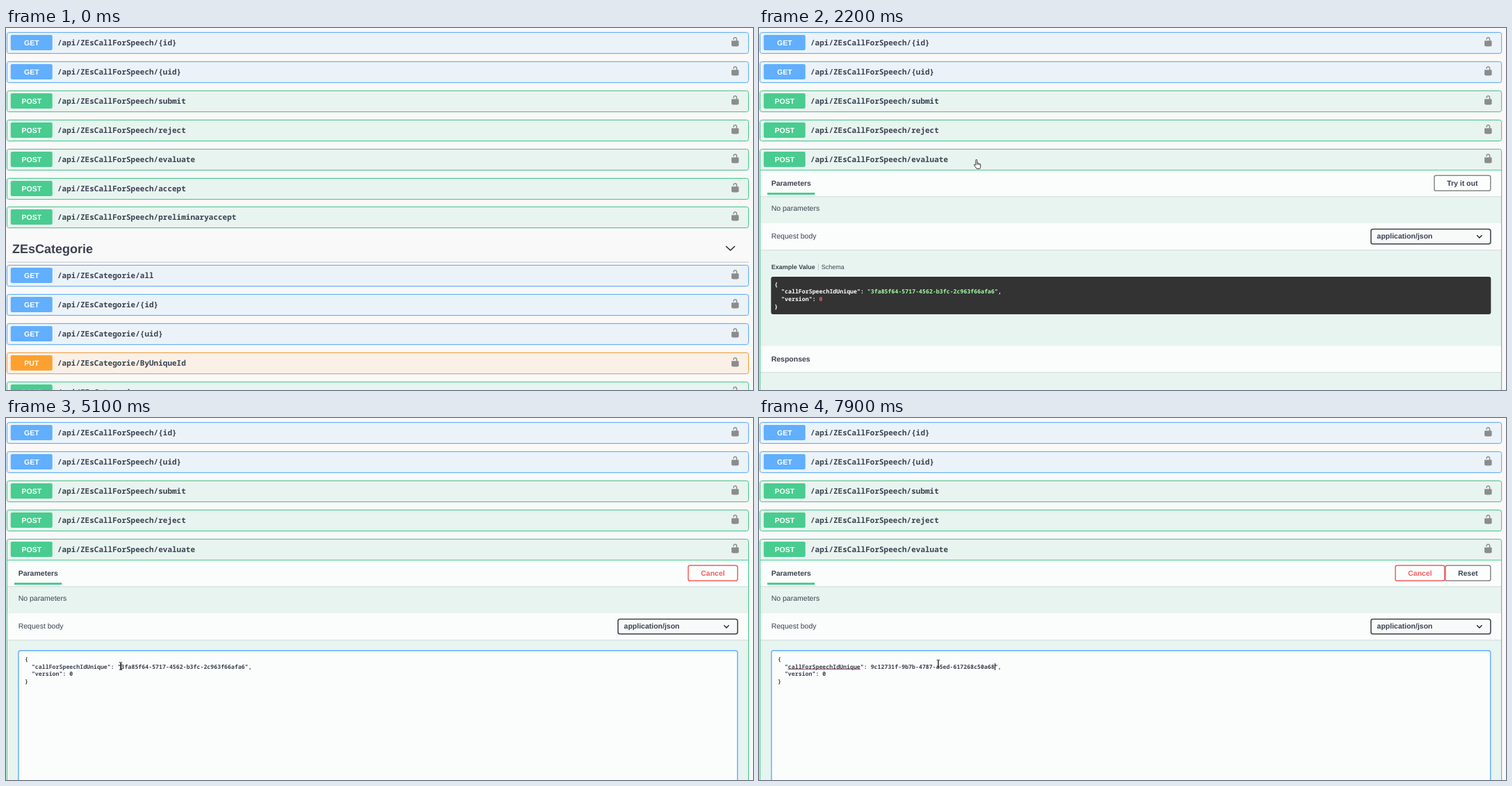
An HTML page that plays this animation: 1075x521 px, repeating every 8000 ms.

```html
<!DOCTYPE html>
<html lang="en">
<head>
<meta charset="utf-8">
<title>API explorer</title>
<style>
  html, body { margin: 0; width: 100%; height: 100%; overflow: hidden; background: #f9f9f9; }
  svg { display: block; width: 1075px; height: 521px; }
  text { font: 10.5px "Liberation Sans", Arial, sans-serif; fill: #3b4151; white-space: pre; text-rendering: geometricPrecision; }
  .b { font-weight: 700; }
  .mid { text-anchor: middle; }
  .badge { fill: #fff; }
  .path { font: 600 11px "Noto Sans Mono", monospace; }
  .code { font: 700 8.25px "Noto Sans Mono", monospace; }
  .small { font-size: 9px; }
  .head { font-size: 18px; }
  .light { fill: #fff; }
  .glow { fill: none; stroke: #000; stroke-opacity: .05; stroke-width: 3; }
  .line { fill: none; stroke: #222; stroke-width: 1.4; }
  .btn { fill: #fcfefd; stroke-width: 1.5; }
  .lock { fill: #8c8c8c; }
  .hidden { display: none; }
</style>
</head>
<body>
<svg id="stage" viewBox="0 0 1075 521"></svg>
<script>
const LOOP = 8000, STEP = 100;
const CHAR = 4.95, PITCH = 10.35;
const ANCHOR = 160.8;            // left edge of the value in the focused editor
const GUID = '3fa85f64-5717-4562-b3fc-2c963f66afa6';
const PASTED = '9c12731f-9b7b-4787-a5ed-617268c50a68';
const KEY = '  "callForSpeechIdUnique": ';
const colors = {
  GET: ['#61affe', '#ebf3f9'],
  POST: ['#49cc90', '#e8f4ef'],
  PUT: ['#fca130', '#fbf0e5']
};
const LOCK = 'M15.8 8H14V5.6C14 2.703 12.665 1 10 1 7.334 1 6 2.703 6 5.6V6h2v-.801C8 3.754 8.797 3 10 3s2 .754 2 2.199V8H4c-.553 0-1 .646-1 1.199V17c0 .549.428 1.139.951 1.307l1.197.387C5.672 18.861 6.55 19 7.1 19h5.8c.549 0 1.428-.139 1.951-.307l1.196-.387c.524-.167.953-.757.953-1.306V9.199C17 8.646 16.352 8 15.8 8z';

const text = (x, y, str, cls = '') => `<text x="${x}" y="${y}" class="${cls}">${str}</text>`;
const rect = (x, y, w, h, attrs) => `<rect x="${x}" y="${y}" width="${w}" height="${h}" ${attrs}/>`;

function row(y, method, path, h = 30) {
  const [main, pale] = colors[method];
  return rect(1.5, y + .5, 1067, h, 'rx="3" class="glow"') +
    rect(1.5, y + .5, 1067, h, `rx="3" fill="${pale}" stroke="${main}"`) +
    rect(6.75, y + 4, 60, 22, `rx="2.2" fill="${main}"`) +
    text(36.8, y + 18.7, method, 'b mid badge') +
    text(74, y + 19, '/api/' + path, 'path') +
    `<path class="lock" transform="translate(1041.8 ${y + 6.3}) scale(.75)" d="${LOCK}"/>`;
}

// white strip with a soft lower edge
const strip = (y, h) => rect(2, y, 1066, h, 'fill="#fbfdfc"') +
  rect(2, y + h, 1066, 1, 'fill="#000" fill-opacity=".07"') +
  rect(2, y + h + 1, 1066, 1, 'fill="#000" fill-opacity=".025"');

const button = (id, x, w, label, color) => `<g id="${id}">` +
  rect(x + .75, 212.25, w - 1.5, 22, `rx="2.6" class="btn" stroke="${color}"`) +
  `<text x="${x + w / 2}" y="227" class="b mid" style="fill:${color === '#888' ? '#3b4151' : color}">${label}</text></g>`;

const lines = (x, y, pitch, list, cls) =>
  list.map((s, i) => text(x, +(y + i * pitch).toFixed(2), s, 'code ' + cls)).join('');

const json = value => ['{', KEY + value + ',', '  "version": 0', '}'];
const editor = (value, cls = '') => lines(27, 350.45, PITCH, json(value), cls);

const speech = 'ZEsCallForSpeech/', cat = 'ZEsCategorie';
const closed = row(174, 'POST', speech + 'evaluate') +
  row(216, 'POST', speech + 'accept') +
  row(257, 'POST', speech + 'preliminaryaccept') +
  text(9, 324, cat, 'b head') +
  '<path class="line" d="M1036 314l6.5 6 6.5-6"/>' +
  rect(2, 336.5, 1067, 1, 'fill="#3b4151" fill-opacity=".3"') +
  row(341, 'GET', cat + '/all') +
  row(383, 'GET', cat + '/{id}') +
  row(425, 'GET', cat + '/{uid}') +
  row(467, 'PUT', cat + '/ByUniqueId') +
  row(509, 'POST', cat);

const example = text(17.7, 347, 'Example Value', 'b small') +
  text(89.8, 347, 'Schema', 'small') +
  rect(85, 339, 1, 10, 'fill="#c4cbc8"') +
  rect(17.3, 358, 1036, 54, 'rx="3" fill="#333"') +
  lines(22.2, 371.5, 10.8, ['{',
    `${KEY}<tspan fill="#a2fca2">"${GUID}"</tspan>,`,
    '  "version": <tspan fill="#d36363">0</tspan>', '}'], 'light') +
  strip(457.5, 37.5) + text(17.7, 479.5, 'Responses', 'b');

const form = rect(17.3, 334, 1036, 220, 'rx="3" fill="#fbfdfc"') +
  rect(17.9, 334.7, 1034.8, 220, 'id="focus" rx="3" fill="none" stroke="#61affe" stroke-width="1.5"') +
  `<g id="before">${editor('"' + GUID + '"')}</g>` +
  `<g id="after">${editor(PASTED + '"')}</g>` +
  `<g id="sel" clip-path="url(#range)">${rect(20, 345, 400, 40, 'fill="#338fec"')}${editor('"' + GUID + '"', 'light')}</g>` +
  rect(41.5, 361.2, 104.5, 1, 'id="spell" fill="#e0393f"') +
  rect(0, 353, 1, 10, 'id="caret" fill="#111"');

const panel = row(174, 'POST', speech + 'evaluate', 380) +
  rect(2, 204, 1066, 1, 'fill="#49cc90"') +
  strip(205, 37) + text(17.7, 227, 'Parameters', 'b') +
  rect(12, 237, 68.3, 3, 'fill="#49cc90"') +
  rect(971, 211.5, 82, 23.5, 'id="hover" rx="3" class="glow"') +
  button('try', 971, 82.5, 'Try it out', '#888') +
  button('cancelHot', 981, 72.5, 'Cancel', '#8c4554') +
  button('cancel', 981, 72.5, 'Cancel', '#f95c5c') +
  `<g id="pair">${button('reset', 987, 66.5, 'Reset', '#888')}${button('cancel2', 915, 72.5, 'Cancel', '#f95c5c')}</g>` +
  text(17.7, 262.8, 'No parameters') +
  strip(281, 38) + text(17.7, 303.2, 'Request body') +
  rect(880, 289.8, 173.5, 22, 'rx="3" class="glow"') +
  rect(880.75, 289.5, 172, 21.2, 'rx="2.8" fill="#f8f9f9" stroke="#41444e" stroke-width="1.5"') +
  text(889.3, 303.2, 'application/json', 'b') +
  '<path class="line" d="M1033.2 298.3l3.6 3.6 3.6-3.6"/>' +
  `<g id="example">${example}</g><g id="form">${form}</g>`;

const pointers = '<g id="hand"><path d="M-.6 8.4V1.4a1 1 0 0 1 2 0V5.4q1.4-.5 1.7.5 1.4-.4 1.7.6 1.5-.2 1.5 1.3V10.2q0 1.6-1 3.4H.8Q-1 11-2.9 8.5-3.2 7.2-1.9 7.4z" fill="#fff" stroke="#222" stroke-width=".9"/><path d="M1.4 5.5v2.6M3.1 6v2.2M4.8 6.6v1.8" stroke="#222" stroke-width=".7"/></g>' +
  '<path id="arrow" d="M.3.5v11.6l2.7-2.5 1.8 4 1.7-.7-1.8-3.9h3.7z" fill="#fff" stroke="#222" stroke-width=".8"/>' +
  '<path id="beam" d="M-2.3-5.2h1.8q.5 0 .5.6V4.6q0 .6-.5.6h-1.8M2.3-5.2H.5Q0-5.2 0-4.6V4.6q0 .6.5.6h1.8" fill="none" stroke="#222" stroke-width=".9"/>';

document.getElementById('stage').innerHTML =
  '<clipPath id="range"><rect id="sel1" x="160.8" y="352.6" height="10.4"/><rect id="sel2" x="26.6" y="362.9" width="70" height="10.5"/></clipPath>' +
  rect(0, 0, 1075, 521, 'fill="#f9f9f9"') +
  row(6, 'GET', speech + '{id}') + row(48, 'GET', speech + '{uid}') +
  row(90, 'POST', speech + 'submit') + row(132, 'POST', speech + 'reject') +
  `<g id="closed">${closed}</g><g id="open">${panel}</g><g id="pointer">${pointers}</g>`;

const $ = id => document.getElementById(id);
const show = (id, on) => $(id).classList.toggle('hidden', !on);

const ease = {
  in: p => p * p,
  out: p => p * (2 - p),
  both: p => p * p * (3 - 2 * p),
  lin: p => p,
  hold: () => 0
};
// time, x, y of the hot spot, easing toward the next entry
const track = [
  [100, 940.5, 91, 'hold'], [500, 940.5, 91, 'both'], [1400, 314, 216, 'out'],
  [2100, 312.5, 189, 'hold'], [2600, 330.5, 194, 'hold'], [2700, 330.5, 194, 'in'],
  [3100, 650, 263, 'out'], [3500, 1006, 226, 'hold'], [3800, 1006, 226, 'both'],
  [4500, 160, 370, 'out'], [4700, 165, 357, 'hold'], [5100, 165, 357, 'lin'],
  [5300, 161, 357, 'in'], [5700, 300, 360, 'lin'], [5800, 325, 363.2, 'out'],
  [6200, 342, 363.5, 'lin'], [6500, 345.5, 358.5, 'hold'], [7200, 345.5, 358.5, 'both'],
  [7900, 258, 353.5, 'hold'], [8000, 258, 353.5, 'hold']
];

function pointerAt(t) {
  const i = Math.max(0, track.findIndex(k => k[0] > t) - 1);
  const [t0, x0, y0, kind] = track[i], [t1, x1, y1] = track[i + 1];
  const p = ease[kind](Math.max(0, (t - t0) / (t1 - t0)));
  return [x0 + (x1 - x0) * p, y0 + (y1 - y0) * p];
}

function pointerKind(t, x, y) {
  const onButton = t >= 2200 && x > 971 && y > 212 && y < 235;
  const onRow = y < 205 ? (y - 6) % 42 < 31 : t < 2200 && y >= 216;
  if (onButton || onRow) return 'hand';
  return t >= 3700 && y > 334 ? 'beam' : 'arrow';
}

function draw(t) {
  const [x, y] = pointerAt(t);
  const kind = pointerKind(t, x, y);
  const opened = t >= 2200, editing = t >= 3700, focused = t >= 4900, pasted = t >= 7100;
  const overButton = opened && kind === 'hand' && y > 210;

  show('closed', !opened);
  show('open', opened);
  show('example', !editing);
  show('form', editing);
  show('try', !editing);
  show('cancelHot', editing && t < 3900);
  show('cancel', t >= 3900 && !pasted);
  show('pair', pasted);
  show('hover', overButton && !editing);

  show('focus', focused);
  show('before', !pasted);
  show('after', pasted);
  $('before').setAttribute('transform', focused ? '' : 'translate(-1.7 -1.7)');
  show('spell', t >= 5400);
  show('caret', focused && t < 5300 || pasted);
  $('caret').setAttribute('x', pasted ? 339.2 : ANCHOR + CHAR - .5);

  show('sel', t >= 5300 && !pasted);
  const twoLines = y >= 363;
  const width = twoLines ? 198.2 : Math.max(0, Math.round((x - ANCHOR) / CHAR)) * CHAR;
  $('sel1').setAttribute('width', width);
  $('sel2').setAttribute('width', twoLines ? 70 : 0);

  show('pointer', t >= 100 && !(t >= 6800 && t < 7200));
  $('pointer').setAttribute('transform', `translate(${x.toFixed(2)} ${y.toFixed(2)})`);
  for (const k of ['hand', 'arrow', 'beam']) show(k, k === kind);
}

const start = performance.now();
function tick() {
  const t = (performance.now() - start) % LOOP;
  draw(Math.floor(t / STEP) * STEP);
  requestAnimationFrame(tick);
}
tick();
</script>
</body>
</html>
```
